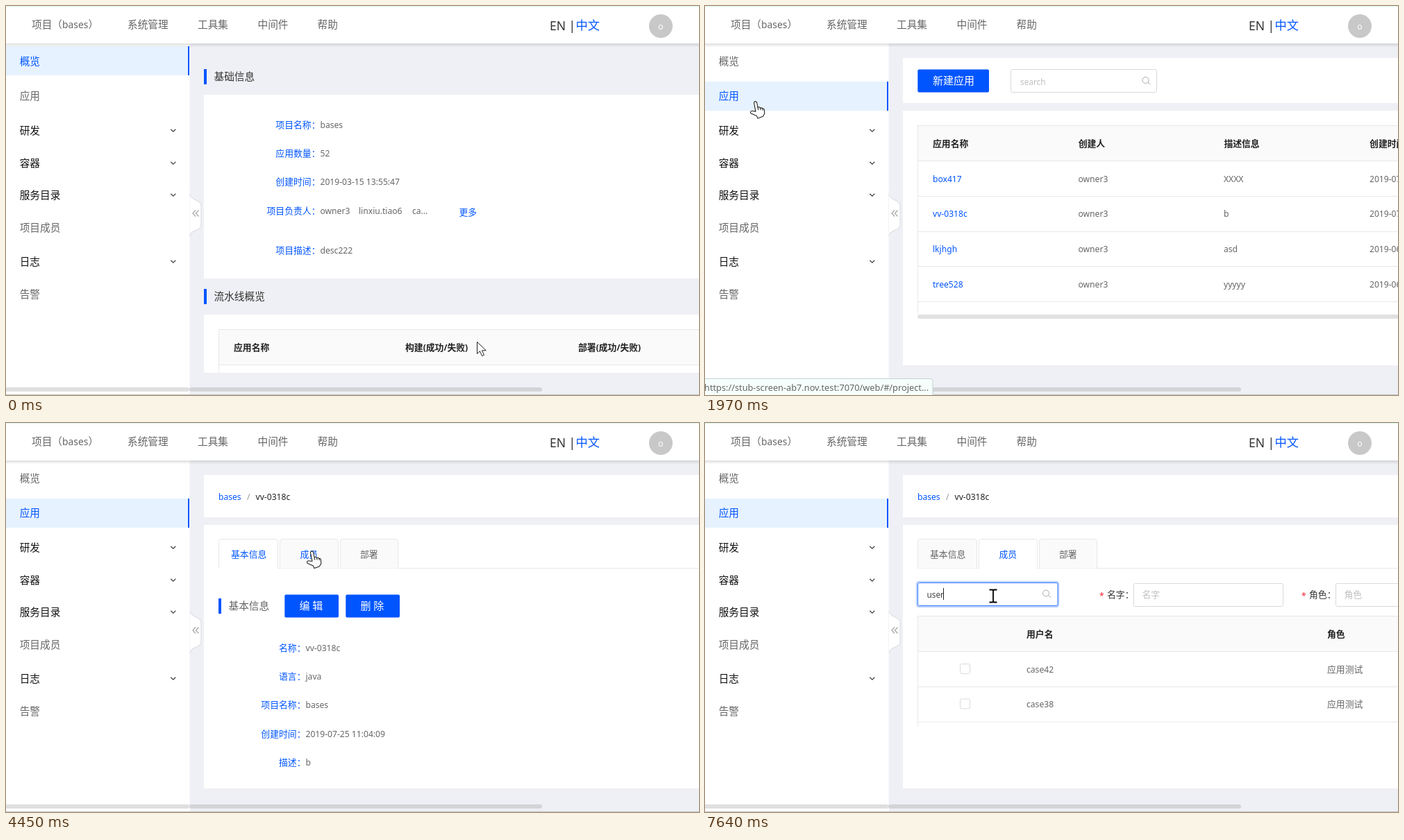
Animation, 998 px wide and 561 px high, one loop 8000 ms. Source, as an HTML page:

```html
<!DOCTYPE html>
<html lang="zh-CN">
<head>
<meta charset="utf-8">
<title>控制台演示</title>
<style>
  html, body { margin: 0; width: 100%; height: 100%; overflow: hidden; background: #fff; }
  svg { display: block; font-family: "Noto Sans", "Noto Sans CJK SC", sans-serif; }
</style>
</head>
<body>
<svg id="stage" width="998" height="561" viewBox="0 0 998 561"></svg>
<script>
const LOOP = 8000;
const BLUE = '#0055ff', GRAY = '#666', DARK = '#222', FAINT = '#bfbfbf', LINE = '#e8e8e8';
const S = 12.83, L = 14.67; // body and large text sizes
const stage = document.getElementById('stage');

// Drawing helpers. Text is placed by its vertical centre.
const rect = (x, y, w, h, fill, extra = '') =>
  `<rect x="${x}" y="${y}" width="${w}" height="${h}" fill="${fill}" ${extra}/>`;
const path = (d, stroke, width = 1, fill = 'none', extra = '') =>
  `<path d="${d}" stroke="${stroke}" stroke-width="${width}" fill="${fill}" ${extra}/>`;
const hline = (x, y, x2 = 998, color = LINE) => path(`M${x} ${y + .5}H${x2}`, color);
const text = (x, cy, s, fill = GRAY, size = S, extra = '') => {
  const body = s.replace(/[ -~]+/g, latin => `<tspan font-size="${(size * .945).toFixed(2)}">${latin}</tspan>`);
  return `<text x="${x}" y="${cy + size * .36}" font-size="${size}" fill="${fill}" xml:space="preserve" ${extra}>${body}</text>`;
};
const bold = (x, cy, s) => text(x, cy, s, DARK, S, 'font-weight="600"');
const card = (y, bottom) => rect(285, y, 713, bottom - y, '#fff');
const field = (x, cy, label, value) =>
  text(x, cy, label + '：', BLUE, S, 'text-anchor="end"') + text(x, cy, value);
const heading = (x, cy, s, color) => rect(x, cy - 11, 4, 22, BLUE) + text(x + 14.5, cy, s, color, L);
const button = (x, y, w, tx, s) =>
  rect(x + .3, y + .4, w - .3, 33.2, BLUE, 'rx="2"') + text(tx, y + 16.5, s, '#fff', 15, 'font-weight="500"');
const input = (x, y, w, stroke = '#d9d9d9') =>
  rect(x + .5, y + .5, w - 1, 33, '#fff', `rx="2" stroke="${stroke}"`);
const magnifier = (x, y) => path(`M${x + 3} ${y + 3}l3.5 3.5M${x + 4} ${y}a4.5 4.5 0 1 1-9 0a4.5 4.5 0 1 1 9 0`, '#aaa');
const tableHead = (y, h, bottom) =>
  rect(306, y, 692, h, '#fafafa') + hline(306, y) + hline(306, y + h) + path(`M306.5 ${y}V${bottom}`, LINE);

function overview() {
  return heading(285, 102, '基础信息', '#333') + card(128, 393)
    + field(452.5, 171, '项目名称', 'bases') + field(452.5, 212, '应用数量', '52')
    + field(452.5, 253.5, '创建时间', '2019-03-15 13:55:47')
    + field(452.5, 295, '项目负责人', 'owner3')
    + text(508, 295, 'linxiu.tiao6') + text(585, 295, 'ca...') + text(652.5, 297.5, '更多', BLUE)
    + field(452.5, 352, '项目描述', 'desc222')
    + heading(285, 419, '流水线概览', '#333') + card(445, 529) + tableHead(466, 51, 529)
    + bold(328, 492.5, '应用名称') + bold(575, 492.5, '构建(成功/失败)') + bold(824, 492.5, '部署(成功/失败)');
}

function appList(hoverRow) {
  const rows = [['box417', 'XXXX', '07-26'], ['vv-0318c', 'b', '07-25'],
                ['lkjhgh', 'asd', '06-28'], ['tree528', 'yyyyy', '06-26']];
  return card(75, 140) + button(306, 91, 103, 328, '新建应用')
    + input(440, 91, 211) + text(454, 109, 'search', FAINT, 12.5) + magnifier(635, 107)
    + card(151, 518) + tableHead(172, 51, 444)
    + ['应用名称', '创建人', '描述信息', '创建时间'].map((s, i) => bold(328 + i * 209.7, 198, s)).join('')
    + rows.map(([name, note, day], i) => {
        const cy = 249 + i * 50.7, bottom = Math.round(274 + i * 50.6);
        return (i === hoverRow ? rect(307, bottom - 50, 691, 50, '#f5f9ff') : '') + hline(306, bottom)
          + text(328, cy, name, BLUE) + text(537.5, cy, 'owner3') + text(747, cy, note)
          + text(957, cy, `2019-${day} 11:04:09`);
      }).join('')
    + rect(306, 445, 700, 6, '#e1e1e1', 'rx="3"');
}

function tabs(active, hover) {
  const items = [[306, 86, 324, '基本信息'], [394, 85, 423.5, '成员'], [481, 84, 510, '部署']];
  return card(75, 136) + text(306, 106, 'bases', BLUE) + text(347, 106, '/', '#999') + text(359.5, 106, 'vv-0318c', DARK)
    + card(147, 527) + hline(306, 209)
    + items.map(([x, w, tx, s], i) => {
        const on = i === active;
        return path(`M${x + .5} 209.5V171q0-3.5 3.5-3.5h${w - 8}q3.5 0 3.5 3.5V209.5`, LINE, 1, on ? '#fff' : '#fafafa')
          + (on ? hline(x + 1, 209, x + w - 1, '#fff') : '')
          + text(tx, 189, s, on || i === hover ? BLUE : GRAY);
      }).join('');
}

function details() {
  const rows = [['名称', 'vv-0318c'], ['语言', 'java'], ['项目名称', 'bases'],
                ['创建时间', '2019-07-25 11:04:09'], ['描述', 'b']];
  return heading(306, 264, '基本信息', GRAY)
    + button(401, 247, 78, 422.5, '编 辑') + button(489, 247, 78, 510.5, '删 除')
    + rows.map(([label, value], i) => field(431.5, 324 + i * 41.3, label, value)).join('');
}

function members(t) {
  const focused = t >= 6320, typed = [7240, 7320, 7470, 7640].filter(k => t >= k).length;
  const caretOn = focused && (t < 6850 || typed);
  const row = (cy, name) => rect(367.5, cy - 7.5, 14, 14, '#fff', 'rx="2" stroke="#d9d9d9"')
    + text(463, cy, name) + text(896, cy, '应用测试') + hline(306, cy + 25);
  const labelled = (x, label, boxX, w) => text(x, 249, '*', '#f5222d') + text(x + 11, 247, label + '：', '#333')
    + input(boxX, 231, w) + text(boxX + 12.5, 247.5, label, FAINT);
  return (focused ? rect(305, 229, 204, 36, 'none', `rx="3" stroke="${BLUE}" stroke-opacity=".25" stroke-width="2.5"`) : '')
    + input(306, 230, 202.5, t >= 5770 ? '#3377ff' : '#d9d9d9')
    + (typed ? text(319.5, 247.5, 'user'.slice(0, typed), '#444', 12.5) : text(319.5, 247.5, 'search', FAINT, 12.5))
    + (caretOn ? rect([320, 327, 333, 340, 343][typed], 238, 1, 17, '#222') : '')
    + magnifier(491.5, 245.5)
    + labelled(568, '名字', 617, 216) + labelled(859, '角色', 908, 120)
    + tableHead(278, 51, 437) + bold(463, 304, '用户名') + bold(896, 304, '角色')
    + row(355, 'case42') + row(405.5, 'case38');
}

function frame(t) {
  const onApps = t >= 1340;
  const menu = [[80, '概览'], [130, '应用'], [180, '研发', 1], [227, '容器', 1],
                [273, '服务目录', 1], [320, '项目成员'], [369, '日志', 1], [416, '告警']];
  const nav = [[37, '项目（bases）'], [175, '系统管理'], [276, '工具集'], [362.5, '中间件'], [448.5, '帮助']];
  const selected = onApps ? 1 : 0, top = onApps ? 109 : 58;
  return rect(0, 54, 264.5, 507, '#fff')
    + path('M264 269q1 7 8 10q9 4 9 8v29q0 5-9 8q-7 3-8 10z', '#e2e4e8', 1.5, '#fff') + rect(258, 266, 6.5, 70, '#fff')
    + path('M273 294.5l-4 4.5 4 4.5M277.5 294.5l-4 4.5 4 4.5', '#aaa', 1.3)
    + rect(0, top, 262, 42, '#e6f2ff') + rect(262, top, 2, 42, BLUE)
    + menu.map(([cy, s, parent], i) => {
        const lit = i === selected || (i === 1 && t >= 790);
        return text(19.7, cy, s, lit ? BLUE : parent ? '#111' : GRAY, L)
          + (parent ? path(`M237.3 ${cy - 2.3}l3.5 3.5 3.5-3.5`, '#444', 1.3) : '');
      }).join('')
    + [5, 4, 3, 2, 1].map(h => rect(0, 54, 998, h, '#000', 'opacity=".024"')).join('')
    + rect(0, 0, 998, 54, '#fff') + rect(0, 0, 998, 1.5, '#e6faf3')
    + nav.map(([x, s]) => text(x, 26.5, s, GRAY, L)).join('')
    + text(783, 28, 'EN | ', '#333', 18.5) + text(820.5, 28, '中文', BLUE, 17.3)
    + '<circle cx="943" cy="29" r="17" fill="#c8c8c8"/>' + text(943, 29.5, 'o', '#fff', S, 'text-anchor="middle"')
    + rect(-4, 550, 268, 6, '#dfdfdf', 'rx="3"') + rect(264, 550, 508, 6, '#d3d4d7', 'rx="3"')
    + rect(0, 560, 998, 1, '#c4c4c4');
}

function page(t) {
  if (t < 1420) return overview();
  if (t < 3370) return appList(t < 2520 ? -1 : t < 2750 ? 0 : 1);
  const onMembers = t >= 4990;
  return tabs(onMembers ? 1 : 0, t >= 4370 ? 1 : -1) + (onMembers ? members(t) : details());
}

const statusBar = () =>
  path('M-1 562V537.5H324q4 0 4 4V562z', '#c3d3d3', 1, '#f6fefc')
  + text(-1, 550, 'https://stub-screen-ab7.nov.test:7070/web/#/project...', GRAY, 13.5);

// Pointer moves: start, end, number of steps, destination.
const moves = [[80, 870, 11, 46, 124], [1970, 2600, 9, 362, 283], [2750, 2750, 1, 362, 285],
               [2820, 2820, 1, 362, 295], [3990, 4450, 7, 441, 185], [5530, 6000, 7, 415, 249]];
const clicks = [[1030, 1340, 48, 125], [2970, 3140, 362, 295], [4840, 4990, 442, 184], [6320, 6620, 415, 248]];
const shapes = [[0, 'arrow'], [790, 'hand'], [2360, 'arrow'], [2820, 'hand'], [3370, 'arrow'],
                [4370, 'hand'], [5610, 'arrow'], [5770, 'beam']];
const pointers = {
  arrow: path('M.5.5V17.5l4-3.8 3 7 3-1.3-3-6.6h5.8z', '#222', 1, '#fff'),
  hand: path('M0 14.5L-2.4 2.5a2 2 0 0 1 4-.9l1.5 7.4c1-1.3 3-1 3.5.8c1-1 2.8-.6 3.2.8c1-.6 2.4 0 2.6 1.5l.4 5.4-2.3 4.2L3 24.5 1.5 21l-8-3.5c-2-1.4-1-4 1.5-3.8zM3.1 9l.8 3.5M6.6 9.8l.6 2.7M9.8 10.6l.5 2.4',
    '#222', 1.1, '#fff', 'stroke-linejoin="round"'),
  beam: path('M-5.5-8.5h4.5l1 1 1-1h4.5M0-8V9M-5.5 9.5h4.5l1-1 1 1h4.5', '#000', 1.8)
};

function pointer(t) {
  let x = 678, y = 484;
  for (const [start, end, steps, tx, ty] of moves) {
    if (t < start) break;
    const step = 1 + Math.floor((t - start) * (steps - 1) / (end - start || 1));
    const u = Math.min(1, step / steps);
    const p = (2 * u + u * u * (3 - 2 * u)) / 3;
    x += (tx - x) * p;
    y += (ty - y) * p;
  }
  const shape = shapes.filter(([start]) => t >= start).pop()[1];
  return clicks.filter(([start, end]) => t >= start && t < end)
      .map(([, , cx, cy]) => `<circle cx="${cx}" cy="${cy}" r="14" fill="#ffff3c" opacity=".72"/>`).join('')
    + `<g transform="translate(${x.toFixed(1)} ${y.toFixed(1)})">${pointers[shape]}</g>`;
}

let shown = '';
function render() {
  const t = performance.now() % LOOP;
  const picture = rect(0, 0, 998, 561, '#eff0f5') + page(t) + frame(t)
    + (t >= 1030 && t < 2200 ? statusBar() : '') + pointer(t);
  if (picture !== shown) stage.innerHTML = shown = picture;
  requestAnimationFrame(render);
}
render();
</script>
</body>
</html>
```
